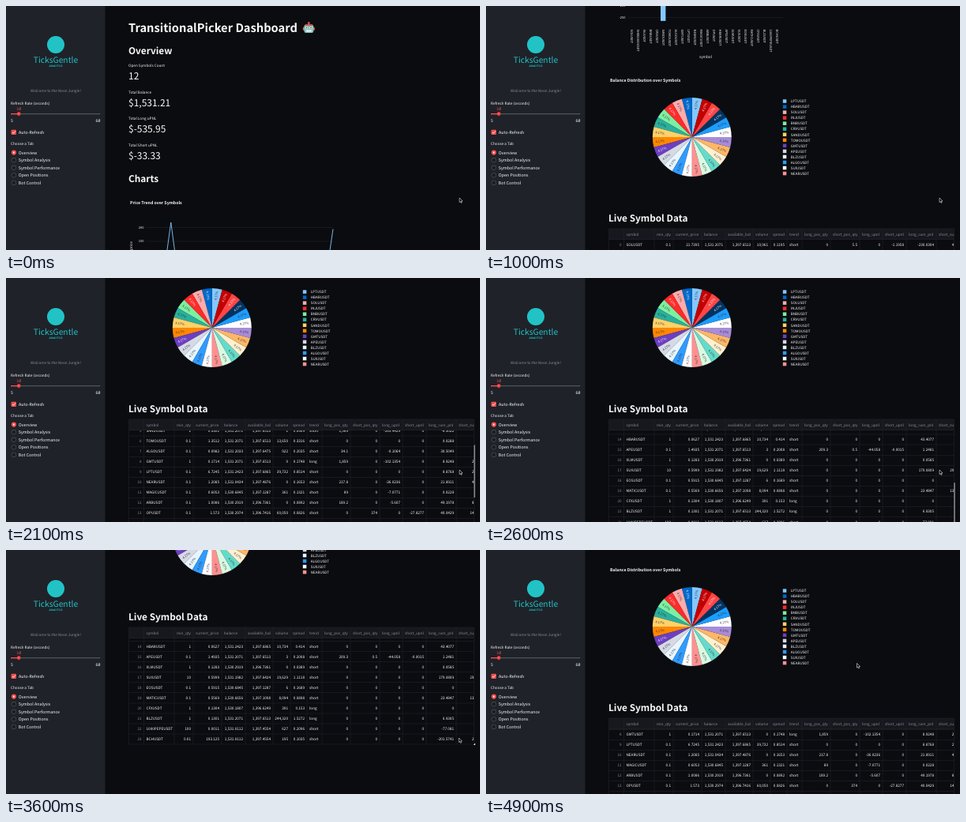
An HTML page with a canvas for the animation above (5 s loop, 600 px wide and 309 px high).

```html
<!DOCTYPE html>
<html lang="en">
<head>
<meta charset="utf-8">
<title>Dashboard</title>
<style>
html, body { margin: 0; height: 100%; overflow: hidden; background: #0b0c10; }
canvas { display: block; width: 600px; height: 309px; }
</style>
</head>
<body>
<canvas id="stage"></canvas>
<script>
const W = 600, H = 309, LOOP = 5000, STEP = 100;
const SANS = '"Noto Sans CJK JP", "Noto Sans CJK SC", "Open Sans", sans-serif';
const MONO = '"Noto Sans Mono", monospace';
const BG = '#0b0c10', INK = '#fafafa', MUTED = '#8b8d95', RED = '#ff4b4b', GRID = '#23262d', CYAN = '#22c3c6';
const BLUE = '#83c9ff', DEEP = '#0068c9';

const canvas = document.getElementById('stage');
const c = canvas.getContext('2d');
const ratio = window.devicePixelRatio || 1;
canvas.width = W * ratio;
canvas.height = H * ratio;

// symbol, min_qty, current_price, balance, volume, spread, trend
const market = `SOL 0.1 21.7395 1531.2071 10961 0.1195 short
SHIB1000 10 0.0083 1530.6845 13270 0.0961 long
INJ 0.1 7.7118 1531.2071 1149 0.2462 short
BNB 0.01 216.975 1531.2071 369 0.0921 long
CRV 0.1 0.4655 1531.2071 0 0.2146 short
SAND 1 0.3301 1531.2071 1 0.0909 short
TOMO 0.1 1.3512 1531.2071 13650 0.3316 short
ALGO 0.1 0.0982 1531.2033 922 0.2035 short
GMT 1 0.1714 1531.2071 0 0.1748 long
LPT 0.1 6.7245 1531.2423 39732 0.8514 short
NEAR 0.1 1.2085 1531.0434 0 0.1653 short
MAGIC 0.1 0.6053 1530.6845 361 0.1321 short
ARB 0.1 1.0086 1530.2919 0 0.0892 short
OP 0.1 1.573 1530.2974 60050 0.0826 short
HBAR 1 0.0627 1531.2423 10734 0.414 short
APE 0.1 1.4935 1531.2071 3 0.2008 short
XLM 1 0.1283 1530.2919 0 0.0389 short
SUI 10 0.5999 1531.1982 19629 1.1118 short
EOS 0.1 0.5915 1530.6845 6 0.1689 short
MATIC 0.1 0.5569 1530.6656 8094 0.0898 short
CFX 1 0.1304 1530.1807 391 0.153 long
BLZ 1 0.1301 1531.2071 244320 1.5272 long
1000PEPE 100 0.0011 1531.0112 627 0.2096 short
BCH 0.01 193.125 1531.0112 195 0.1035 short`;

// long/short quantity, long/short upnl, long/short cumulative pnl
const positions = {
  SOL: '0 5.5 0 -1.1958 -230.0304 4.5127', SHIB1000: '53670 11790 -12.0464 -0.9335 2.4784 0',
  INJ: '195.4 19.2 -61.5221 -3.3706 76.9537 7.2184', BNB: '0 0 0 0 0.0087 0',
  CRV: '49.7 0 -1.9353 0 0.05 0', SAND: '1569 0 -265.4429 0 -6.3022 0',
  TOMO: '0 0 0 0 0.0288 0', ALGO: '34.1 0 -0.1064 0 30.5049 0',
  GMT: '1859 0 -102.1354 0 8.9248 2.1653', LPT: '0 0 0 0 8.8768 2.4419',
  NEAR: '217.8 0 -36.0236 0 21.8911 4.3372', MAGIC: '89 0 -7.0771 0 0.0228 0',
  ARB: '189.2 0 -5.607 0 49.1978 8.1146', OP: '0 374 0 -27.8277 40.0429 14.2963',
  HBAR: '0 0 0 0 43.4077 0', APE: '209.3 0.5 -44.058 -0.0015 1.2481 0',
  XLM: '0 0 0 0 0.0585 0', SUI: '0 0 0 0 179.0809 29.1175',
  MATIC: '0 0 0 0 23.4847 13.2258', BLZ: '0 0 0 0 6.9305 0',
  '1000PEPE': '0 0 0 0 -77.081 0', BCH: '0 0 0 0 -201.5741 2.5538'
};

const format = n => Number(n).toLocaleString('en-US', { maximumFractionDigits: 4 });
const rows = market.split('\n').map(line => {
  const [name, qty, price, balance, volume, spread, trend] = line.split(' ');
  const held = (positions[name] || '0 0 0 0 0 0').split(' ').map(Number);
  return {
    symbol: name + 'USDT', price: +price, long: held[2], short: held[3],
    cells: [name + 'USDT', ...[qty, price, balance, balance - 133.5558, volume, spread].map(format), trend, ...held.map(format)]
  };
});
const columns = 'symbol min_qty current_price balance available_bal volume spread trend long_pos_qty short_pos_qty long_upnl short_upnl long_cum_pnl short_cum_pnl'.split(' ');
const edges = [174.5, 213, 237, 273, 303, 338, 360, 381, 400, 436, 473, 502, 532, 570, 607];

const slices = `83c9ff 0068c9 ffabab ff2b2b 7defa1 29b09d ffd16a ff8700 6d3fc0 d5dae5 e9f5ff 309bff
ffffff ff9191 d8fae3 64dbca fff0d0 ffb766 a78cd9 ffffff 1d9dff 003463 ff4545 c40000`.split(/\s/).map(hex => '#' + hex);
const darkSlices = new Set([1, 3, 8, 21, 22, 23]);
const legend = 'LPT HBAR SOL INJ BNB CRV SAND TOMO GMT APE BLZ ALGO SUI NEAR'.split(' ');

const pageTrack = [[200, 0], [500, 190], [800, 430], [1000, 503], [1400, 606], [2600, 606], [3200, 672], [3500, 687], [3600, 687], [3800, 574], [3900, 572]];
const tableTrack = [[1400, 0], [2100, 71.5], [2600, 178], [2700, 179.5], [3900, 179.5], [4400, 104.5]];
const cursorX = [[2700, 574], [3500, 573.3], [4400, 573.3], [4900, 469.5]];
const cursorY = [[2700, 243], [3500, 238], [4400, 238], [4900, 143.5]];

// Monotone cubic through [time, value] points, flat at both ends.
function follow(points, t) {
  const last = points.length - 1;
  if (t <= points[0][0]) return points[0][1];
  if (t >= points[last][0]) return points[last][1];
  const rise = i => (points[i + 1][1] - points[i][1]) / (points[i + 1][0] - points[i][0]);
  const slope = i => {
    if (i === 0 || i === last) return 0;
    const a = rise(i - 1), b = rise(i);
    return a * b > 0 ? 2 * a * b / (a + b) : 0;
  };
  const i = points.findIndex(p => p[0] > t) - 1;
  const [t0, v0] = points[i], [t1, v1] = points[i + 1];
  const d = t1 - t0, u = (t - t0) / d, w = 1 - u;
  return v0 * w * w * (1 + 2 * u) + v1 * u * u * (3 - 2 * u) + d * u * w * (slope(i) * w - slope(i + 1) * u);
}

// y is the middle of the capitals
function text(s, x, y, size, { color = INK, bold = false, align = 'left', angle = 0, face = SANS } = {}) {
  c.save();
  c.translate(x, y);
  c.rotate(angle);
  c.font = `${bold ? 700 : 400} ${size / 1.117}px ${face}`;
  c.textRendering = 'geometricPrecision';
  c.textAlign = align;
  c.fillStyle = color;
  c.fillText(s, 0, size * 0.33);
  c.restore();
}

function rect(x, y, w, h, color, radius = 0) {
  c.fillStyle = color;
  c.beginPath();
  c.roundRect(x, y, w, h, radius);
  c.fill();
}

function circle(x, y, r, color) {
  c.fillStyle = color;
  c.beginPath();
  c.arc(x, y, r, 0, 7);
  c.fill();
}

function path(points, color, width) {
  c.beginPath();
  points.forEach(p => c.lineTo(...p));
  c.strokeStyle = color;
  c.lineWidth = width;
  c.stroke();
}

function robot(x, y) {
  circle(x + 7.5, y + 1.6, 1.5, '#e8453c');
  rect(x + 7, y + 2.5, 1, 2, '#8b9aa0');
  rect(x, y + 6.5, 15, 4.5, '#e8653c', 1.5);
  rect(x + 1.6, y + 3.5, 11.8, 10.5, '#7fc4c9', 2.5);
  rect(x + 2.5, y + 3.5, 10, 1.8, '#e2574c', 1);
  for (const eye of [4.8, 10.2]) {
    circle(x + eye, y + 7.6, 1.7, '#fff4c2');
    circle(x + eye, y + 7.6, 0.8, '#2b2f33');
  }
  rect(x + 4, y + 10.6, 7, 2, '#f4f4f4', 0.6);
}

function drawSidebar() {
  rect(0, 0, 125.5, H, '#1f2229');
  circle(63, 49, 11, CYAN);
  text('TicksGentle', 63, 68, 11.5, { color: CYAN, align: 'center' });
  text('ANALYTICS', 63, 75.5, 3.6, { color: CYAN, bold: true, align: 'center' });
  text('Welcome to the Neon Jungle!', 63, 107.5, 5.23, { color: MUTED, align: 'center' });
  text('Refresh Rate (seconds)', 6, 123, 5.23);
  text('10', 16.2, 130.2, 5.6, { color: RED, align: 'center', face: MONO });
  rect(6, 136, 113.5, 1.3, '#50535b', 0.6);
  rect(6, 136, 10, 1.3, RED, 0.6);
  circle(16.2, 136.6, 2.3, RED);
  text('5', 6, 145.5, 5.6, { face: MONO });
  text('60', 119.5, 145.5, 5.6, { align: 'right', face: MONO });
  rect(6.6, 156.7, 6.4, 6.4, RED, 1);
  path([[8, 160], [9.3, 161.4], [11.7, 158.5]], '#fff', 0.9);
  text('Auto-Refresh', 16, 160, 5.98);
  text('Choose a Tab', 6, 174.5, 5.23);
  ['Overview', 'Symbol Analysis', 'Symbol Performance', 'Open Positions', 'Bot Control'].forEach((tab, i) => {
    const y = 185.6 + i * 9.55;
    circle(9.9, y, 3.1, i ? '#50535b' : RED);
    circle(9.9, y, i ? 2.5 : 1.1, i ? '#1b1e24' : '#fff');
    text(tab, 15.8, y, 5.98);
  });
}

function drawMetrics() {
  text('TransitionalPicker Dashboard', 155, 28, 16.4, { bold: true });
  robot(375.8, 20);
  text('Overview', 155, 57, 13.2, { bold: true });
  [['Open Symbols Count', '12'], ['Total Balance', '$1,531.21'], ['Total Long uPNL', '$-535.95'], ['Total Short uPNL', '$-33.33']].forEach(([label, value], i) => {
    const y = 75.6 + i * 33.4;
    text(label, 155, y, 5.23);
    text(value, 155, y + 13.4, 13.4);
  });
  text('Charts', 155, 218.5, 13.2, { bold: true });
}

function drawAxes(title, y, left, right, ticks, tickY, labelX, yTitle) {
  text(title, 157, y, 5.9, { bold: true });
  for (const tick of ticks) {
    rect(left, tickY(tick) - 0.2, right - left, 0.5, GRID);
    text(tick, left - 3.5, tickY(tick), 4.48, { align: 'right' });
  }
  rows.forEach((row, i) => text(row.symbol, labelX(i), y + 109.5, 4.48, { angle: Math.PI / 2 }));
  text('symbol', (left + right) / 2, y + 144, 5.23, { align: 'center' });
  text(yTitle, 158.5, y + 64, 5.23, { align: 'center', angle: -Math.PI / 2 });
}

function drawLineChart() {
  const x = i => 178 + i * 10.26, y = v => 351.5 - v * 0.357;
  drawAxes('Price Trend over Symbols', 249, 178, 414, [0, 50, 100, 150, 200], y, x, 'current_price');
  c.lineJoin = 'round';
  path(rows.map((row, i) => [x(i), y(row.price)]), BLUE, 0.9);
}

function drawBarChart() {
  const x = i => 184 + i * 8.04, y = v => 442 - v * 0.301;
  drawAxes('Profit and Loss over Symbols', 423, 180, 376, [0, -50, -100, -150, -200, -250], y, x, 'value');
  rows.forEach((row, i) => {
    rect(x(i) - 3.2, y(0), 6.4, y(row.long) - y(0), BLUE);
    rect(x(i) - 3.2, y(row.long), 6.4, y(row.short) - y(0), DEEP);
  });
  text('variable', 379, 443, 5.1);
  [['long_upnl', BLUE], ['short_upnl', DEEP]].forEach(([label, color], i) => {
    rect(379, 449 + i * 7, 4.5, 4.5, color);
    text(label, 389, 451 + i * 7, 5.1);
  });
}

function drawPie() {
  text('Balance Distribution over Symbols', 157, 597.5, 5.9, { bold: true });
  const x = 260.8, y = 669, r = 50, turn = Math.PI / 12;
  slices.forEach((color, i) => {
    const start = -Math.PI / 2 - (i - 1) * turn - turn;
    c.fillStyle = color;
    c.beginPath();
    c.moveTo(x, y);
    c.arc(x, y, r, start, start + turn);
    c.fill();
    const mid = start + turn / 2;
    text('4.17%', x + 41 * Math.cos(mid), y + 41 * Math.sin(mid), 4.48, {
      align: 'center', color: darkSlices.has(i) ? '#fff' : '#333',
      angle: Math.cos(mid) < 0 ? mid + Math.PI : mid
    });
  });
  legend.forEach((name, i) => {
    rect(375.8, 621.3 + i * 7.04, 4.5, 4.5, slices[i]);
    text(name + 'USDT', 385.8, 623.6 + i * 7.04, 5.1);
  });
}

function drawTable(scroll, showThumb) {
  const left = 155.5, right = 592.5, top = 785, body = 799, bottom = 933, pitch = 13.06;
  text('Live Symbol Data', 155, 772, 13.2, { bold: true });
  c.save();
  c.beginPath();
  c.rect(left, top, right - left, bottom - top);
  c.clip();
  rows.forEach((row, i) => {
    const y = 805.5 + i * pitch - scroll;
    if (y < top || y > bottom + pitch) return;
    rect(left, y + pitch / 2, right - left, 0.5, GRID);
    text(i, 171.5, y, 5.1, { color: MUTED, align: 'right' });
    row.cells.forEach((cell, k) => {
      const words = k === 0 || k === 7;
      text(cell, words ? edges[k] + 3 : edges[k + 1] - 3, y, 5.2, { align: words ? 'left' : 'right' });
    });
  });
  rect(left, top, right - left, body - top, '#16181e');
  rect(left, body - 0.5, right - left, 0.5, GRID);
  columns.forEach((name, k) => text(name, edges[k] + 3, 792, 5.2, { color: MUTED }));
  edges.forEach(x => rect(x - 0.25, top, 0.5, bottom - top, GRID));
  c.restore();
  c.strokeStyle = GRID;
  c.lineWidth = 0.5;
  c.strokeRect(left, top, right - left, bottom - top);
  if (showThumb) rect(592, top + scroll * 0.45, 2, 67, '#6d6f75', 1);
  c.fillStyle = '#d8d8da';
  c.beginPath();
  [[594, 931.5], [594, 934], [591.5, 934]].forEach(p => c.lineTo(...p));
  c.fill();
}

function drawCursor(x, y) {
  c.beginPath();
  [[0, 0], [0, 5.6], [1.3, 4.4], [2.2, 6.4], [3.1, 6], [2.3, 4.1], [4, 4]].forEach(([dx, dy]) => c.lineTo(x + dx, y + dy));
  c.closePath();
  c.fillStyle = '#000';
  c.fill();
  c.strokeStyle = '#eee';
  c.lineWidth = 0.6;
  c.stroke();
}

function draw(t) {
  c.setTransform(ratio, 0, 0, ratio, 0, 0);
  rect(0, 0, W, H, BG);
  c.save();
  c.translate(0, -follow(pageTrack, t));
  drawMetrics();
  drawLineChart();
  drawBarChart();
  drawPie();
  drawTable(follow(tableTrack, t), (t > 1400 && t < 3000) || (t > 3900 && t < 4700));
  c.restore();
  drawSidebar();
  drawCursor(follow(cursorX, t), follow(cursorY, t));
}

const begin = performance.now();
let shown = -1;
function tick() {
  const t = Math.floor((performance.now() - begin) % LOOP / STEP) * STEP;
  if (t !== shown) draw(shown = t);
  requestAnimationFrame(tick);
}
tick();
</script>
</body>
</html>
```
